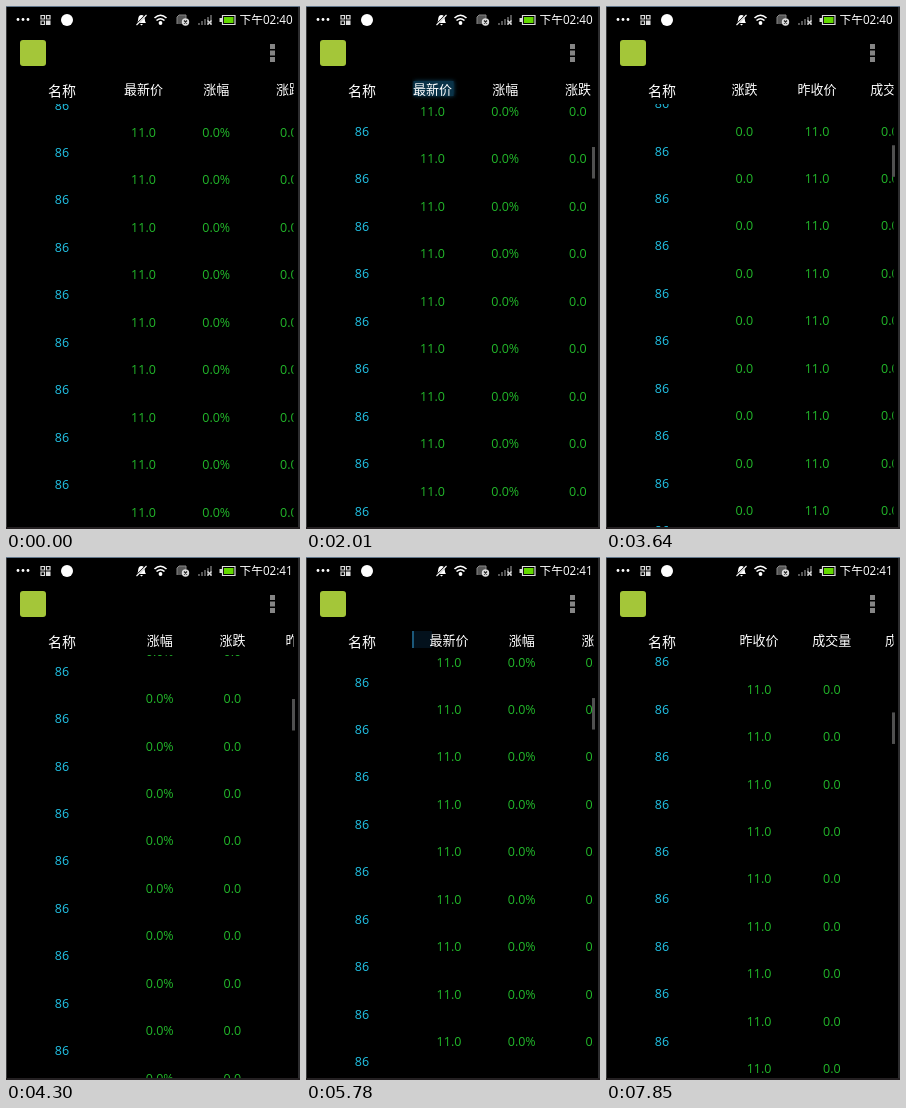
Recreate the animation shown at these times as an HTML page with a canvas. Size 294 by 523 pixels, loop 8 s.

```html
<!DOCTYPE html>
<html lang="zh-CN">
<head>
<meta charset="utf-8">
<style>
html, body { margin: 0; width: 294px; height: 523px; overflow: hidden; background: #000; }
canvas { display: block; }
</style>
</head>
<body>
<canvas id="stage" width="294" height="523"></canvas>
<script>
const ctx = document.getElementById('stage').getContext('2d');
const LOOP = 8000, PITCH = 47.45, COLUMN = 72.7;
const FONT = '"Open Sans", "Noto Sans CJK SC", "Noto Sans CJK", sans-serif';
const CJK = '"Noto Sans CJK SC", "Noto Sans CJK", sans-serif';
const columns = [['最新价', '11.0'], ['涨幅', '0.0%'], ['涨跌', '0.0'],
  ['昨收价', '11.0'], ['成交量', '0.0'], ['成交额', '0.0']];

// Moments at which the screen refreshes, in ms
const ticks = [0, 1470, 1620, 1770, 1890, 2010, 2160, 2310, 2430, 2560, 2710, 2860,
  3010, 3130, 3280, 3520, 3640, 3790, 3910, 4030, 4150, 4300, 4420, 4540, 4690, 4810,
  4960, 5360, 5520, 5660, 5780, 5930, 6050, 6170, 6320, 6440, 6560, 6680, 6830, 6950,
  7070, 7220, 7340, 7460, 7610, 7730, 7850];

// Drag path: time, horizontal scroll, height of the first row
const path = [[0, 5.5, 126.5], [1350, 5.5, 126.5], [2010, 16.5, 105.5], [2860, 145, 165.4],
  [3280, 150, 150], [3640, 150, 125], [4300, 62, 94.1], [4810, 25, 55], [4960, 25, 40],
  [5360, 25, 40], [5780, 0, 105], [6680, 50, 94.1], [7850, 208, -57.7]];

function scrollAt(t) {
  const i = path.findIndex(p => p[0] >= t);
  if (i < 1) return path[0].slice(1);
  const a = path[i - 1], b = path[i], k = (t - a[0]) / (b[0] - a[0]);
  return [1, 2].map(n => a[n] + (b[n] - a[n]) * k);
}

function rect(color, x, y, w, h) {
  ctx.fillStyle = color;
  ctx.fillRect(x, y, w, h);
}

function text(str, x, y, size, color, family = FONT) {
  ctx.font = `${size}px ${family}`;
  ctx.fillStyle = color;
  ctx.fillText(str, x, y);
}

function shape(d, color, stroke) {
  const p = new Path2D(d);
  ctx.lineWidth = stroke || 1;
  ctx.fillStyle = ctx.strokeStyle = color;
  stroke ? ctx.stroke(p) : ctx.fill(p);
}

function circle(color, x, y, r) {
  ctx.fillStyle = color;
  ctx.beginPath();
  ctx.arc(x, y, r, 0, 7);
  ctx.fill();
}

function clipped(x, y, w, h, draw) {
  ctx.save();
  ctx.beginPath();
  ctx.rect(x, y, w, h);
  ctx.clip();
  draw();
  ctx.restore();
}

function statusBar(t) {
  for (const x of [12, 17, 22]) circle('#fff', x, 13.5, 1.4);
  shape('M35 9.5h3.5v3.5h-3.5z M40.5 9.5h3.5v3.5h-3.5z M35 15h3.5v3.5h-3.5z', '#ddd', 1.2);
  rect('#ddd', 40, 14.5, 4.5, 4.5);
  circle('#fff', 61, 14, 6);
  shape('M131 17C133 15 131 9 135.5 9S138 15 140 17z M134 18h3l-1.5 1.5z', '#fff');
  shape('M130 19L141 8', '#000', 2);
  shape('M130.5 19L140.5 9', '#fff', 1.1);
  shape('M148.5 12Q154.5 6.500 160.500 12 M150.500 14.500Q154.500 11 158.500 14.500', '#fff', 1.6);
  circle('#fff', 154.5, 17, 1.9);
  shape('M171 18V11L173 9H180V18z', '#555');
  shape('M171 18V11L173 9H180V12', '#888', 1);
  circle('#ddd', 179.500, 16, 3.7);
  shape('M178 14.500l3 3m0-3l-3 3', '#222', 1.2);
  for (let i = 0; i < 5; i++) rect('#555', 192 + i * 3, 17 - i * 2, 2, 2 + i * 2);
  shape('M201.500 14.500l4 4m0-4l-4 4', '#ddd', 1.3);
  shape('M216.500 9.500h12.500v9h-12.500z', '#ddd', 1.2);
  rect('#ddd', 213.5, 12, 2.5, 4);
  rect('#63d800', 218, 11, 9.5, 6);
  ctx.textAlign = 'left';
  text(t < 3790 ? '下午02:40' : '下午02:41', 233.5, 18, 11.7, '#fff');
}

function actionBar() {
  ctx.fillStyle = '#a4c639';
  ctx.beginPath();
  ctx.roundRect(14, 34, 26, 26, 3);
  ctx.fill();
  for (const y of [38, 44.5, 51]) rect('#858585', 264, y, 5, 5);
}

function pressedHeader(t, x) {
  if (t >= 1620 && t < 2160) {
    ctx.shadowColor = '#0d4560';
    ctx.shadowBlur = 4;
    rect('#0a3348', x - 19, 75, 40, 15);
    ctx.shadowBlur = 0;
  } else if (t >= 5660 && t < 6680) {
    rect('#03111c', 106, 74, 20, 17);
    rect('#1b587a', 106, 74, 2, 17);
  }
}

function table(t) {
  const [scrollX, top] = scrollAt(t);
  const first = 143 - scrollX;
  const first_row = Math.floor((50 - top) / PITCH);
  const eachRow = draw => {
    for (let i = 0; i < 12; i++) draw(top + (first_row + i) * PITCH + 4.5);
  };
  ctx.textAlign = 'center';
  text('名称', 56, 89.5, 14, '#fff', CJK);
  clipped(40, 98, 60, 423, () => eachRow(y => text('86', 56, y + 20, 12.5, '#22c4e8')));
  clipped(106, 70, 181.5, 28, () => {
    pressedHeader(t, first);
    columns.forEach(([name], i) => text(name, first + i * COLUMN, 88, 13, '#fff', CJK));
  });
  clipped(106, 98, 181.5, 423, () => columns.forEach(([, value], i) =>
    eachRow(y => text(value, first + i * COLUMN, y, 12.5, '#22b82a'))));
  const barShown = t >= 1620 && (t < 5360 || t >= 5520);
  if (barShown) rect('#505050', 286, 141 + (105.5 - top) / 11.3, 3, 31.5);
}

function frame(now) {
  const elapsed = now % LOOP;
  const t = ticks.filter(tick => tick <= elapsed).pop();
  rect('#000', 0, 0, 294, 523);
  statusBar(t);
  actionBar();
  table(t);
  rect('#3a3a3c', 0, 0, 1, 523);
  rect('#2c2c2e', 292, 0, 2, 523);
  rect('#242022', 0, 521, 294, 2);
  rect('#62778c', 0, 0, 294, 1);
  requestAnimationFrame(frame);
}
requestAnimationFrame(frame);
</script>
</body>
</html>
```
